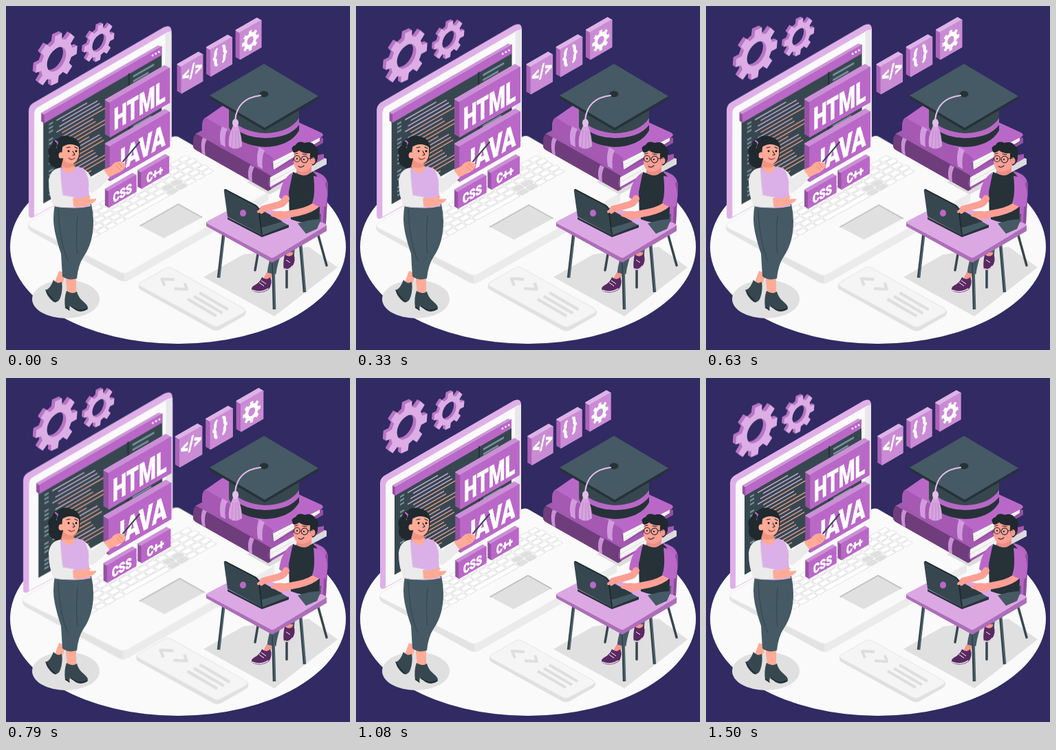
An HTML page for the animation above (1540 ms loop, 500 by 500 pixels).

```html
<!DOCTYPE html>
<html lang="en">
<head>
<meta charset="utf-8">
<title>Learning to code</title>
<style>
html, body { margin: 0; width: 100%; height: 100%; overflow: hidden; background: #312a63; }
svg { display: block; width: 100vw; height: 100vh; }
text { font-family: Roboto, Inter, sans-serif; font-weight: 900; fill: #fff; stroke: #fff; stroke-width: .6; }
.line { fill: none; stroke-linecap: round; stroke-linejoin: round; }
#laptop { transform-origin: 207px 212px; }
#titles { transform-origin: 191px 190px; }
#tiles { transform-origin: 310px 73px; }
#slab { transform-origin: 271px 425px; }
</style>
</head>
<body>
<svg viewBox="0 0 500 500">
  <rect width="500" height="500" fill="#312a63"/>
  <ellipse cx="250" cy="350" rx="244" ry="141" fill="#fafafa"/>
  <g fill="#e0e0e0">
    <ellipse cx="87" cy="426" rx="49" ry="28"/>
    <path d="M287 394L345 361L440 350L482 380L390 451Z"/>
  </g>
  <g id="gears"></g>
  <g id="laptop"></g>
  <g id="titles"></g>
  <g id="tiles"></g>
  <g id="slab">
    <path d="M194 405V410Q195 412 199 414L300 470Q305 472 310 470L345 450Q348 448 348 443Z" fill="#e0e0e0"/>
    <path d="M197 402L232 382Q237 379 242 382L344 439Q349 443 344 446L310 464Q305 467 300 464L197 408Q192 405 197 402Z" fill="#f5f5f5" stroke="#e6e6e6"/>
    <g class="line" stroke="#dedede" stroke-width="4" style="stroke-linecap:butt">
      <path d="M245 398L227 397L231 407M245 411L263 412L260 403"/>
      <path d="M281 417L322 441M273 422L314 446M264 426L305 450"/>
    </g>
  </g>

  <g id="books">
    <path d="M350 256L383 274L466 230V222L440 215Z" fill="#dcdcdc"/>
    <path d="M275 186L290 178L400 228L462 215V222L382 268Z" fill="#a259b0"/>
    <path d="M384 249L440 218V232L384 263Z" fill="#f5f5f5"/>
    <path d="M384 256L440 225" stroke="#dcdcdc"/>
    <path d="M277 186Q272 188 272 196V205Q273 208 277 210L381 269L386 266Q378 260 385 247L380 244Z" fill="#6f3d7b"/>
    <path d="M286 191L292 194Q287 201 290 217L285 214Q282 200 286 191ZM355 231L361 234Q356 242 358 256L353 253Q350 240 355 231Z" fill="#ca8fd6"/>
    <path d="M286 185L383 243L461 199V192L440 185Z" fill="#9350a1"/>
    <path d="M388 224L456 190V196L389 238Z" fill="#fafafa"/>
    <path d="M390 231L456 194M390 235L440 207" stroke="#dcdcdc"/>
    <path d="M289 163L312 147L340 130L458 184Q463 187 459 190L386 227Z" fill="#ba68c8"/>
    <path d="M290 162Q285 165 285 173V181Q285 185 289 187L382 243L392 239Q382 233 389 222L383 217Z" fill="#a559b3"/>
    <path d="M314 175L322 179Q317 187 319 205L312 201Q309 186 314 175ZM368 205L376 210Q371 219 373 237L366 233Q363 217 368 205Z" fill="#d29bdd"/>
  </g>

  <g id="cap">
    <path d="M324 146V176Q335 203 375 204Q416 203 426 180V146Z" fill="#37474f"/>
    <path d="M329 166Q345 183 376 185Q412 184 426 163V173Q412 192 376 192Q345 191 331 176Z" fill="#b768c5"/>
    <path d="M331 176Q346 191 376 192Q412 192 426 173V181Q412 204 376 205Q344 203 332 186Z" fill="#263238"/>
    <path d="M296 130V134L376 181L454 135V131Z" fill="#263238"/>
    <path d="M375 84L454 131L376 177L296 130Z" fill="#455a64"/>
    <ellipse cx="375" cy="128" rx="6.5" ry="4.5" fill="#263238"/>
    <path class="line" d="M370 130Q336 134 333 166" stroke="#e3bdea" stroke-width="2.2"/>
    <path d="M330 174Q322 190 324 204Q333 211 343 204Q343 188 337 174Z" fill="#d6a4df"/>
    <path d="M330 181L328 206M334 181V207M337 181L339 206" stroke="#bd7fc9" stroke-width=".8"/>
    <ellipse cx="333.500" cy="170" rx="4.500" ry="6" fill="#e3bdea"/>
  </g>

  <g id="student">
    <g class="line" stroke="#37474f" stroke-width="3.500">
      <path d="M453 330L466 377M367 355L362 384M408 352V409"/>
    </g>
    <path d="M447 240Q469 245 468 264L465 316Q464 324 454 331L442 334Z" fill="#b564c3"/>
    <path d="M464 258Q468 250 468 264L465 316Q464 324 455 330Q461 322 461 312Z" fill="#8e4d9b"/>
    <path class="line" d="M396 352Q388 372 386 389M414 344L412 366" stroke="#455a64" stroke-width="13" style="stroke-linecap:butt"/>
    <path d="M379 387L387 390L382 402L373 398ZM407 358L417 358L416 366L406 366Z" fill="#f4978d"/>
    <path d="M372 394Q379 400 384 394Q388 403 382 412Q370 420 358 414Q355 409 361 406Q369 402 372 394ZM405 361Q412 367 418 360Q422 370 416 379Q410 387 404 382Q402 377 405 361Z" fill="#592962"/>
    <path class="line" d="M358 413Q370 418 381 411M405 382Q411 385 416 378" stroke="#e8d5ec" stroke-width="1.500"/>
    <path d="M368 402L375 407M371 399L378 404M407 369L413 373" stroke="#fff"/>
    <path d="M414 310L458 302L456 324L432 334Z" fill="#455a64"/>
    <path d="M416 242Q400 252 397 278Q405 285 414 284Z" fill="#ba68c8"/>
    <path d="M417 241Q431 249 446 241Q458 250 457 266L455 316Q433 322 412 311L411 270Z" fill="#263238"/>
    <path d="M423 230L444 228V241Q434 251 422 242Z" fill="#ec8f86"/>
    <path d="M419 209Q430 203 446 210L448 228Q442 240 430 241Q419 240 418 226Z" fill="#fd9f95"/>
    <path d="M417 212Q413 204 421 202Q425 195 434 199Q444 196 449 203Q456 208 453 217Q454 228 446 232Q441 226 442 214Q432 215 426 210Q420 215 417 212Z" fill="#1f292e"/>
    <ellipse cx="446" cy="225" rx="3.500" ry="5" fill="#f4978d"/>
    <g class="line" stroke="#263238" stroke-width="1.200">
      <circle cx="423" cy="222" r="4.500"/><circle cx="434" cy="223" r="4.800"/>
      <path d="M439 222L446 221M420 215L424 214M431 215L437 216M425 233Q429 236 433 232"/>
    </g>
    <circle cx="423" cy="222" r="1.100"/><circle cx="433" cy="223" r="1.100"/>
    <g class="line" stroke="#37474f" stroke-width="4.500" style="stroke-linecap:butt">
      <path d="M317 326L309 395M388 366L390 441M428 345L434 416"/>
    </g>
    <path d="M318 326L310 395M389 366L391 441M429 345L435 416" stroke="#546e7a" stroke-width="1.300"/>
    <path d="M291 314V320L387 373L466 327V318Z" fill="#ad6eb9"/>
    <path d="M294 312L342 287L410 302L456 314Q464 315 466 319L390 365Q387 367 384 365L294 317Q289 315 294 312Z" fill="#dba8e4"/>
    <path d="M413 280L456 280L455 314Q438 319 414 310Z" fill="#263238"/>
    <path d="M424 316Q444 309 458 310L452 324L436 331Z" fill="#455a64"/>
    <path class="line" d="M407 280Q404 287 396 289L374 295" stroke="#fd9f95" stroke-width="10"/>
    <path d="M322 306L372 333L411 319L368 294Z" fill="#455a64"/>
    <path d="M345 305L373 322L402 313L372 298Z" fill="#2c3a41"/>
    <path d="M322 307V310L372 336L411 322V318L372 333Z" fill="#263238"/>
    <path d="M319 266Q316 266 317 270L322 306L372 333L367 294Q366 291 363 289Z" fill="#37474f"/>
    <path class="line" d="M319 267L363 290Q366 292 367 295L372 332" stroke="#1f292e" stroke-width="1.800"/>
    <ellipse cx="344.500" cy="301" rx="4.500" ry="5" fill="#ba68c8"/>
    <path class="line" d="M373 294L367 299M378 295L371 300" stroke="#fd9f95" stroke-width="4"/>
    <path class="line" d="M453 287Q444 296 425 300L404 304" stroke="#fd9f95" stroke-width="10"/>
    <path d="M406 299Q395 296 386 302Q382 306 391 307L401 311L409 309Z" fill="#fd9f95"/>
    <path d="M447 247Q466 248 467 276L465 291Q454 294 445 286Q450 274 447 247Z" fill="#ba68c8"/>
  </g>

  <g id="teacher">
    <path d="M77 385L88 389L80 408L70 404ZM86 390L102 389L102 418L89 417Z" fill="#ffab97"/>
    <path d="M69 398Q75 405 81 401Q83 412 79 424Q76 432 69 430Q58 421 58 413Q65 410 69 398ZM88 414Q96 420 103 415Q105 424 114 431Q121 437 118 441Q110 447 101 442L93 435L92 442L86 439Q84 424 88 414Z" fill="#37474f"/>
    <path d="M58 413Q64 424 72 430M87 438L92 442M94 436Q106 446 118 440" class="line" stroke="#1f292e" stroke-width="1.500"/>
    <path d="M71 288Q67 309 71 328Q75 346 80 360L82 393Q91 400 103 396Q105 376 113 364Q127 344 127 313Q127 300 124 288Z" fill="#455a64"/>
    <path class="line" d="M104 305Q101 342 104 360M76 295Q78 345 90 370" stroke="#37474f" stroke-width="1.200"/>
    <path d="M75 193Q82 186 94 190Q105 192 108 204L106 222L91 235Q80 241 70 234Q59 229 63 218Q58 207 67 202Q67 195 75 193Z" fill="#1f292e"/>
    <path class="line" d="M72 196Q78 199 74 206" stroke="#ba68c8" stroke-width="2.500"/>
    <path d="M83 222L98 224L99 234Q92 242 80 234Z" fill="#f2937f"/>
    <path d="M82 205Q93 197 106 205L106 216Q104 228 96 229Q85 229 81 218Z" fill="#ffab97"/>
    <path d="M78 212Q82 197 96 199Q104 199 107 208Q106 193 90 191Q74 192 73 211Z" fill="#1f292e"/>
    <ellipse cx="80" cy="217" rx="3.500" ry="4.500" fill="#ffab97"/>
    <g class="line" stroke="#1f292e" stroke-width="1.200">
      <path d="M88 206L93 205M100 205L104 207M97 211L100 216L97 217"/>
      <path d="M91 221Q95 225 100 221" stroke="#a23c45"/>
    </g>
    <circle cx="91" cy="211" r="1.400"/><circle cx="102" cy="211" r="1.400"/>
    <path d="M108 235Q119 238 125 251L142 238L151 249Q138 264 125 272Q116 269 111 258Z" fill="#ebebeb"/>
    <path d="M79 234Q92 242 103 233L113 236Q122 250 120 266L123 291Q98 297 73 290L76 252Z" fill="#dbb0e8"/>
    <path d="M81 233Q91 238 101 232Q100 242 91 243Q83 241 81 233Z" fill="#ffab97"/>
    <path d="M79 235Q64 237 62 254Q62 276 69 290Q82 294 100 292L99 278L83 275L80 258Z" fill="#ebebeb"/>
    <path class="line" d="M80 250L82 275L99 278M71 291Q84 294 99 292" stroke="#d8d8d8"/>
    <path d="M97 279Q107 281 114 278Q121 274 123 277L119 281L131 280Q132 283 125 287Q113 294 98 291Z" fill="#ffab97"/>
    <path d="M142 238L153 233Q158 225 166 226Q174 228 174 232Q171 240 162 243L150 249Z" fill="#ffab97"/>
    <path class="line" d="M164 229L170 235M161 233L167 239" stroke="#e58479"/>
    <path class="line" d="M170 226L194 198" stroke="#37474f" stroke-width="2"/>
  </g>
</svg>
<script>
const SLOPE = 0.577, LOOP = 1540;
const purple = "#ba68c8";
const get = id => document.getElementById(id);
const iso = (x, y, s = 1) => `matrix(${s} ${-s * SLOPE} 0 1 ${x} ${y})`;
const poly = (pts, fill, more = "") => `<polygon points="${pts}" fill="${fill}" ${more}/>`;
const label = (s, x, y, size, squeeze) =>
  `<text transform="${iso(x, y, squeeze)}" font-size="${size}">${s}</text>`;

// Upright slab: front face plus its left and top edges
function block(x, y, w, h, d, front, side, top) {
  const r = y - w * SLOPE, k = d * SLOPE, join = c => `stroke="${c}" stroke-width="1.5" stroke-linejoin="round"`;
  return poly([x, y, x - d, y - k, x - d, y + h - k, x, y + h], side, join(side)) +
    poly([x, y, x - d, y - k, x + w - d, r - k, x + w, r], top, join(top)) +
    poly([x, y, x + w, r, x + w, r + h, x, y + h], front, join(front));
}

// Toothed ring, cut out in the middle
function ring(R, hole, turn = 0) {
  const pts = [], n = 8, step = Math.PI * 2 / n;
  for (let i = 0; i < n; i++)
    for (const [f, r] of [[-0.31, 0.75], [-0.21, 1], [0.21, 1], [0.31, 0.75]]) {
      const a = (i + f) * step + turn;
      pts.push((Math.cos(a) * R * r).toFixed(2) + " " + (Math.sin(a) * R * r).toFixed(2));
    }
  return `M${pts.join("L")}ZM${hole} 0A${hole} ${hole} 0 1 0 ${-hole} 0A${hole} ${hole} 0 1 0 ${hole} 0Z`;
}
function gear(x, y, R, depth) {
  const d = ring(R, R * 0.46, 0.1);
  let out = "";
  for (let k = depth; k >= 0; k -= 0.5)
    out += `<path d="${d}" fill-rule="evenodd" fill="${k ? "#b875c5" : "#dcaee5"}" transform="${iso(x - k, y - k * SLOPE, 0.866)}"/>`;
  return out;
}

function screen() {
  let s = `<path d="M35 153Q35 146 41 142L229 33Q240 28 240 39V196L41 306Q35 308 35 302Z" fill="#dfb0e8"/>
    <path d="M43 158Q43 151 48 148L233 41Q240 37 240 45V196L43 304Z" fill="#fafafa"/>
    <path d="M231 43L240 38V196L231 198Z" fill="#e9e6ec"/>` +
    poly([56, 157, 226, 60, 226, 190, 56, 286], "#37474f") +
    poly([53, 156, 221, 59, 226, 61, 57, 159], "#cf94da") +
    poly([57, 159, 226, 61, 226, 73, 57, 171], purple) +
    poly([53, 156, 57, 159, 57, 171, 53, 168], "#93509f");
  for (let i = 0; i < 3; i++) s += `<circle cx="${213 + i * 4.5}" cy="${73.5 - i * 2.5}" r="1.4" fill="#fff"/>`;
  let rows = "";
  for (let i = 0; i < 19; i++) {
    const y = 18 + i * 5.6, warm = i > 3 && i % 5;
    const from = 18 + (i * 5 % 3) * 4, len = 44 + (i * 37 % 30);
    rows += `<path d="M${from} ${y}h${len}" stroke="${warm ? "#eda191" : "#d5b5e0"}" stroke-width="1.5"/>`;
    if (i % 4 != 3) rows += `<path d="M7 ${y}h6" stroke="#78909c" stroke-width="2.6"/>`;
  }
  rows += `<path d="M122 10V104" stroke="#263238" stroke-width="2"/>
    <path d="M128 18h30M128 25h22M128 90h26M128 97h20" stroke="#78909c" stroke-width="3"/>`;
  return s + `<g transform="matrix(1 -.572 0 1 57 159)">${rows}</g>`;
}

function base() {
  let s = `<path d="M34 316V321Q36 325 40 327L165 396Q172 400 179 396L379 282V269Z" fill="#e3e3e3"/>
    <path d="M172 385V399Q176 398 179 396L379 282V269Z" fill="#ebebeb"/>
    <path d="M38 312L241 191Q246 189 250 191L376 264Q381 268 376 272L179 384Q172 388 165 384L38 320Q31 316 38 312Z" fill="#fafafa" stroke="#efefef"/>`;
  let keys = "";
  for (let r = 0; r < 5; r++)
    for (let c = 0; c < 14; c++) {
      if (r == 4 && c > 3 && c < 9) continue;
      const grey = c > 8 && c < 11 && r > 2;
      keys += `<rect x="${c * 14.4 + (r % 2) * 2}" y="${r * 9.6}" width="12.4" height="7.8" rx="1.5" fill="${grey ? "#e0e0e0" : "#fff"}"/>`;
    }
  keys += `<rect x="57.6" y="38.4" width="70" height="7.8" rx="1.5" fill="#fff"/>`;
  return s + `<g transform="matrix(.874 -.4856 .8727 .4885 86 314)" stroke="#dcdcdc">${keys}</g>
    <path d="M195 318L250 287L284 306L229 336Z" fill="#e0e0e0"/>
    <path d="M195 318L250 287L284 306" class="line" stroke="#bdbdbd" stroke-width="1.5"/>`;
}

get("gears").innerHTML = gear(73.5, 77.5, 35, 4.5) + gear(135.5, 53.5, 25.5, 3.5);
get("laptop").innerHTML = base() + screen();

const plate = (x, y, w, h, d) => block(x, y, w, h, d, purple, "#9552a2", "#cb8fd6");
get("titles").innerHTML =
  plate(152, 204, 85, 49, 7) + label("JAVA", 158, 244, 43, 0.68) +
  plate(152, 141, 85, 49, 7) + label("HTML", 157, 181, 43, 0.63) +
  plate(150, 268, 39, 23, 5) + label("CSS", 156, 285, 18.5, 0.77) +
  plate(197, 241, 39, 23, 5) + label("C++", 204, 257, 18.5, 0.74);

const icons = [
  label("&lt;/&gt;", 257, 111, 26, 0.8),
  label("{ }", 300.5, 86, 27, 0.86),
  `<path d="${ring(14.5, 5.5)}" fill="#fff" fill-rule="evenodd" transform="${iso(354.5, 50.5, 0.84)}"/>`
];
get("tiles").innerHTML = icons.map((icon, i) =>
  block(256 + i * 42, 88 - i * 24.4, 30, 38, 6, "#ca8bd5", "#ab63b8", "#deb3e6") + icon).join("");

// Double heartbeat: [time, amount of growth]
const beat = [[0, 0.13], [134, 1], [422, 0], [582, 0], [736, 1], [890, 0], [1520, 0], [1540, 0.13]];
const timing = { duration: LOOP, iterations: Infinity, easing: "linear" };
const pulse = beat.map(([t, k]) => ({ offset: t / LOOP, transform: `scale(${1 + 0.091 * k})` }));
const moves = ["laptop", "titles", "tiles", "slab"].map(id => get(id).animate(pulse, timing));
moves.push(get("gears").animate(
  [0, -10, 0].map(y => ({ transform: `translateY(${y}px)` })), timing));
moves.forEach(m => { m.startTime = document.timeline.currentTime; });
</script>
</body>
</html>
```
